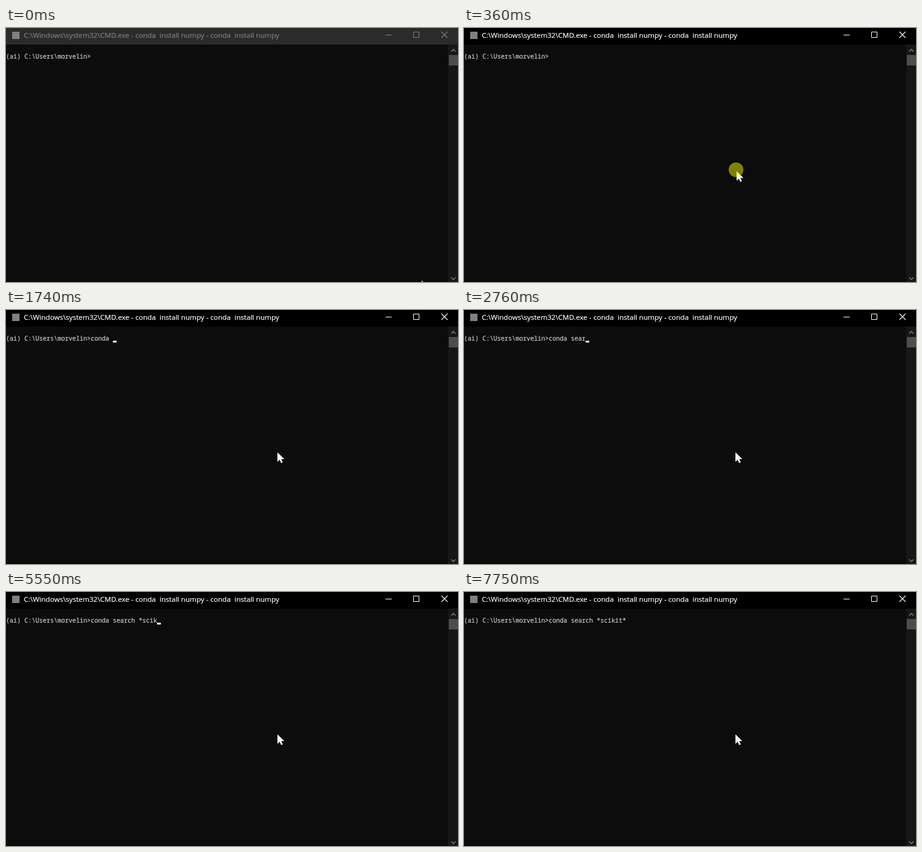
These frames come from a looping animation (736x414 px, 8 s). An HTML page:

```html
<!DOCTYPE html>
<html lang="en">
<head>
<meta charset="utf-8">
<title>Console typing</title>
<style>
  html, body { margin: 0; width: 100%; height: 100%; overflow: hidden; background: #0c0c0c; }
  svg { display: block; width: 736px; height: 414px; }
  text { white-space: pre; }
  #bar { fill: #2b2b2b; color: #808080; }
  #bar.active { fill: #000; color: #fff; }
  .title { font: 11.63px "Open Sans", "Noto Sans", sans-serif; fill: currentColor; stroke: currentColor; stroke-width: .2; }
  .line { font: 10px "Noto Sans Mono", "DejaVu Sans Mono", monospace; fill: #d4d4d4; stroke: #d4d4d4; stroke-width: .15; }
  .buttons { fill: none; stroke: currentColor; }
  .arrows { fill: none; stroke: #777; stroke-width: 1.6; }
</style>
</head>
<body>
<svg viewBox="0 0 736 414">
  <rect width="736" height="414" fill="#0c0c0c"/>
  <rect y="412" width="720" height="2" fill="#080808"/>

  <g id="bar">
    <rect width="736" height="27"/>
    <rect x="10" y="6" width="12" height="12" fill="#808080"/>
    <text class="title" x="29" y="16">C:\Windows\system32\CMD.exe - conda  install numpy - conda  install numpy</text>
    <g class="buttons">
      <path d="M618 11.5h10M663.5 6.5h9v9h-9z"/>
      <path d="M709 6l10 10M719 6l-10 10" stroke-width="1.1"/>
    </g>
  </g>

  <rect x="720" y="27" width="16" height="387" fill="#171717"/>
  <rect x="721" y="44" width="15" height="17" fill="#4d4d4d"/>
  <path class="arrows" d="M725 38.5l3.5-3.5 3.5 3.5M725 406.5l3.5 3.5 3.5-3.5"/>

  <text class="line" x="0" y="50">(ai) C:\Users\morvelin&gt;</text>
  <text class="line" id="typed" x="138" y="50"></text>
  <rect id="caret" y="50" width="6" height="3" fill="#fff"/>

  <path id="mouse" d="M0 0v15.5l3.6-3.4 2.5 5.4 2.6-1.2-2.5-5.2h5z" fill="#fff"/>
  <circle id="click" cx="443" cy="231" r="12" fill="#ff0" fill-opacity=".48"/>
</svg>

<script>
  const LOOP = 8000, CELL = 6, START_X = 138;
  const KEY_GAP = 155;    // ms between keys within a burst
  const MOVE_STEP = 72;   // ms between pointer positions
  const MOVE_STEPS = 6;
  const CLICK = MOVE_STEP * (MOVE_STEPS - 1);

  const bursts = [
    { at: 960, text: "conda " },
    { at: 2290, text: "search " },
    { at: 4000, text: "*" },
    { at: 4850, text: "scik" },
    { at: 6410, text: "it" },
    { at: 7430, text: "*" }
  ];
  const caretFlips = [900, 1910, 2290, 3540, 4550, 5630, 6090, 6650, 7200, 7750];

  const el = id => document.getElementById(id);
  const bar = el("bar"), typed = el("typed"), caret = el("caret"), click = el("click"), mouse = el("mouse");
  const show = (node, on) => node.setAttribute("visibility", on ? "visible" : "hidden");
  const mix = (a, b, p) => a + (b - a) * p;

  const typedAt = t => bursts
    .map(({ at, text }) => text.slice(0, Math.max(0, Math.floor((t - at) / KEY_GAP) + 1)))
    .join("");
  const caretAt = t => caretFlips.filter(flip => flip <= t).length % 2 === 1;

  function draw(t) {
    const text = typedAt(t);
    typed.textContent = text;
    caret.setAttribute("x", START_X + CELL * text.length);
    show(caret, caretAt(t));

    const step = Math.min(Math.floor(t / MOVE_STEP), MOVE_STEPS);
    const eased = 1 - (1 - step / MOVE_STEPS) ** 2.7;
    mouse.setAttribute("transform", `translate(${mix(677, 442, eased)} ${mix(411.5, 232, eased)})`);
    show(click, t >= CLICK && t < CLICK + 80);
    bar.classList.toggle("active", t >= CLICK);
  }

  function tick() {
    draw(performance.now() % LOOP);
    requestAnimationFrame(tick);
  }
  tick();
</script>
</body>
</html>
```
